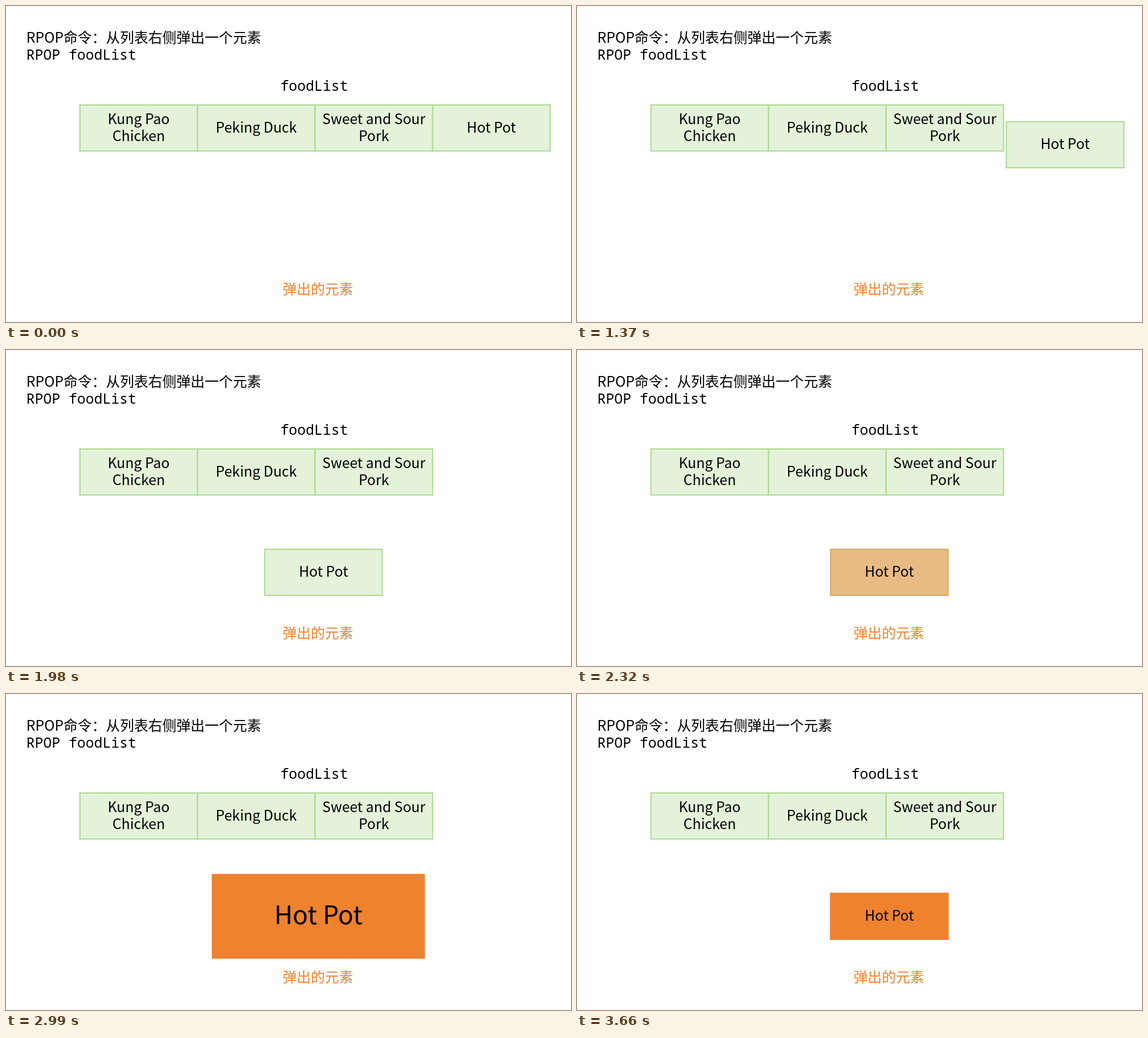
These frames come from a looping animation (1001 by 559 pixels, 4520 ms). An HTML page:

```html
<!DOCTYPE html>
<html lang="zh-CN">
<head>
<meta charset="utf-8">
<title>RPOP</title>
<style>
  html, body { margin: 0; height: 100%; overflow: hidden; background: #fff; }
  svg { display: block; width: 100%; height: 100%; }
  text { font: 25px "Noto Sans CJK SC", "Noto Sans CJK", sans-serif; }
  .mono { font-family: "Noto Sans Mono", monospace; }
  .mid { text-anchor: middle; }
  rect { fill: #e3f2d9; stroke: #acd78e; stroke-width: 2; }
</style>
</head>
<body>
<svg viewBox="0 0 1001 559">
  <text x="36" y="65">RPOP命令：从列表右侧弹出一个元素</text>
  <text class="mono" x="36" y="94.5">RPOP foodList</text>
  <text class="mono mid" x="546" y="149.5">foodList</text>
  <text class="mid" x="552.5" y="510" fill="#ee822f">弹出的元素</text>
  <g id="list"></g>
</svg>
<script>
const LOOP = 4520, START = 1060, END = 3660, STEP = 68.75;
const W = 208.25, H = 81.5, LEFT = 131, MIDY = 215.75;
const GREEN = [227, 242, 217], EDGE = [172, 215, 142], ORANGE = [238, 130, 47];
const foods = [['Kung Pao', 'Chicken'], ['Peking Duck'], ['Sweet and Sour', 'Pork'], ['Hot Pot']];

const list = document.getElementById('list');
const cellX = i => LEFT + W * (i + 0.5);
list.innerHTML = foods.map((lines, i) =>
  `<g transform="translate(${cellX(i)} ${MIDY})">
    <rect x="${-W / 2}" y="${-H / 2}" width="${W}" height="${H}"/>` +
  lines.map((s, k) =>
    `<text class="mid" y="${7.75 + 30 * (k - (lines.length - 1) / 2)}">${s}</text>`).join('') +
  '</g>').join('');
const item = list.lastElementChild, box = item.querySelector('rect');

const clamp = v => Math.max(0, Math.min(1, v));
const mix = (a, b, p) => `rgb(${a.map((v, i) => Math.round(v + (b[i] - v) * p))})`;
const bezier = (u, b, c, d) =>
  3 * u * (1 - u) ** 2 * b + 3 * u * u * (1 - u) * c + u ** 3 * d;

// Steep S-curve along the path, with slow ends
function travel(t) {
  if (t < START) return 0;
  if (t > 2095) return 1;
  const d = (t - 1593) / 100;
  return 1 / (1 + Math.exp(-1.28 * d / (1 + 0.079 * Math.abs(d))));
}

// Fraction of the curve's length -> curve parameter
const path = u => [bezier(u, 30, 0, -306.5), bezier(u, 168, 178, 177.5)];
const lengths = [0];
for (let i = 1; i <= 400; i++) {
  const [x, y] = path((i - 1) / 400), [x2, y2] = path(i / 400);
  lengths.push(lengths[i - 1] + Math.hypot(x2 - x, y2 - y));
}
const along = s => path(lengths.findIndex(l => l >= s * lengths[400]) / 400);

// Grow to double size and back: soft ends, sharp turn at the peak
function growth(t) {
  const d = 565 - Math.abs(t - 3095), ramp = 146;
  if (d <= 0) return 0;
  return 0.00203 * (d < ramp ? d * d / (2 * ramp) : d - ramp / 2);
}

// The motion advances in even steps, about 15 per second
function pose(t) {
  if (t < START) return 0;
  if (t >= END) return END;
  return START + 10 + STEP * Math.floor((t - START) / STEP);
}

function draw(now) {
  const t = pose(now % LOOP);
  const [x, y] = along(travel(t));
  const tint = clamp((t - 2110) / 400);
  item.setAttribute('transform',
    `translate(${cellX(3) + x} ${MIDY + y}) scale(${1 + growth(t)})`);
  box.style.fill = mix(GREEN, ORANGE, tint);
  box.style.stroke = mix(EDGE, ORANGE, tint);
  requestAnimationFrame(draw);
}
requestAnimationFrame(draw);
</script>
</body>
</html>
```
